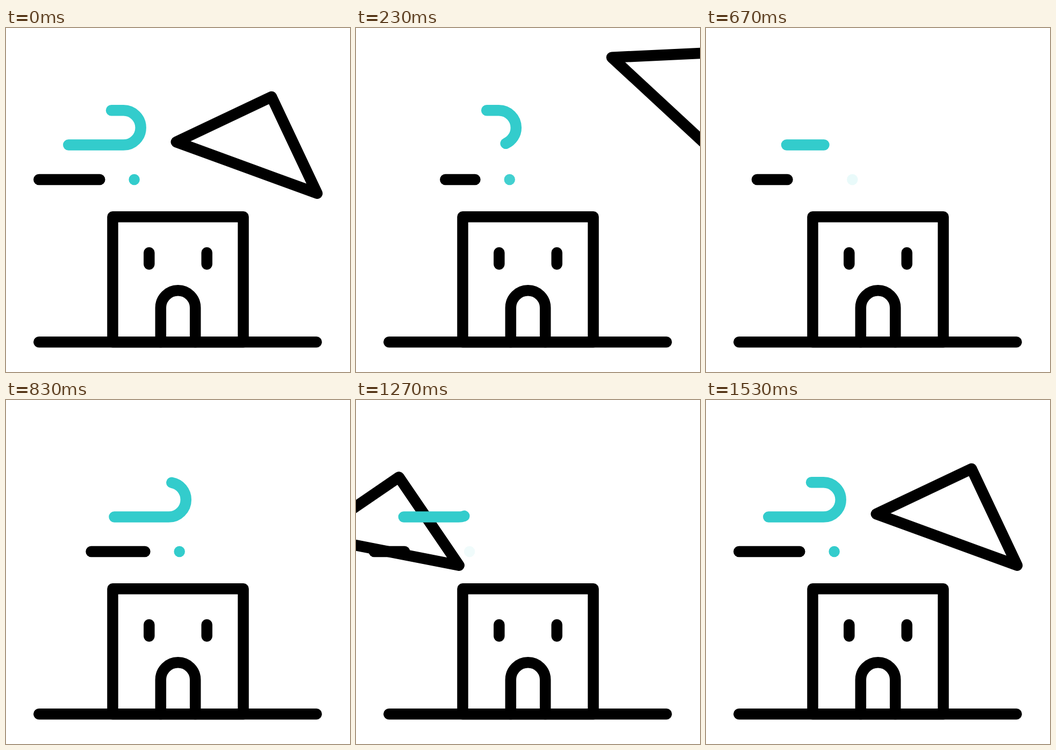
These frames come from a looping animation (640 by 640 pixels, 1670 ms). An HTML page:

```html
<!DOCTYPE html>
<html lang="en">
<head>
<meta charset="utf-8">
<title>Roof in the wind</title>
<style>
  html, body { margin: 0; width: 100%; height: 100%; overflow: hidden; background: #fff; }
  svg { display: block; width: 100%; height: 100%; }
  .ink { fill: none; stroke: #000; stroke-width: 20.5; stroke-linecap: round; stroke-linejoin: round; }
  .teal { stroke: #3cc; }
</style>
</head>
<body>
<svg viewBox="0 0 640 640">
  <g class="ink">
    <path d="M198.5 351.3H441.5V584.3H198.5Z"/>
    <path d="M61.3 584.3H577.5"/>
    <path d="M266.3 418V439.5M373.7 418V439.5"/>
    <path d="M287.8 584.3V520.5a32.2 32.2 0 0 1 64.4 0V584.3"/>
    <path id="roof" d="M-262 -95.7L-84.8 -179.7L0 0Z"/>
    <g id="wind">
      <path id="line" pathLength="1" d="M61.3 282H174.3"/>
      <path id="curl" class="teal" pathLength="1" d="M116.3 217.6H218.5a32.2 32.2 0 0 0 0 -64.4H196"/>
      <circle id="dot" cx="238.6" cy="282" r="10.25" fill="#3cc" stroke="none"/>
    </g>
  </g>
</svg>
<script>
const LOOP = 1670, FPS = 30;
const [roof, wind, line, curl, dot] =
  ['roof', 'wind', 'line', 'curl', 'dot'].map(id => document.getElementById(id));

const clamp = x => Math.min(1, Math.max(0, x));
const ease = (n, from, to) => {
  const u = clamp((n - from) / (to - from));
  return u * u * (3 - 2 * u);
};
const bezier = (a, b, c, s) => (1 - s) * (1 - s) * a + 2 * s * (1 - s) * b + s * s * c;

function trim(path, from, to) {
  const len = to - from;
  path.style.visibility = len > 0.001 ? 'visible' : 'hidden';
  path.setAttribute('stroke-dasharray', Math.max(len, 0) + ' 9');
  path.setAttribute('stroke-dashoffset', -from);
}

// The roof pivots on its right corner.
function roofPose(n) {
  if (n < 16) {
    const s = clamp(n / 13) ** 1.365;
    return [bezier(578.8, 688, 840, s), bezier(307.7, 205, 236, s), 33.7 * (1 - (1 - s) ** 2)];
  }
  const away = 168 * (Math.max(0, 46 - n) / 5) ** 1.776;
  return [578.8 - away, 307.7, -away * 0.02326];
}

// Three gusts: one leaves, one passes by, one arrives.
function windPose(n) {
  if (n < 15) {
    const p = ease(n, 0.8, 13);
    return { x: 92 * p, line: [p, 1], curl: [p, 1], dot: 1 - ease(n, 6, 12) };
  }
  if (n < 33) return {
    x: 92 * ease(n, 15, 27.2),
    line: [ease(n, 23.3, 31.3), ease(n, 15, 25)],
    curl: [ease(n, 24.7, 32), ease(n, 15.5, 27.7)],
    dot: ease(n, 19, 24) - ease(n, 26, 32)
  };
  const p = ease(n, 33, 43);
  return { x: -55 * (1 - p), line: [0, p], curl: [0, p], dot: ease(n, 37, 43) };
}

function draw(ms) {
  const n = Math.floor((ms + 3.4) * FPS / 1000);
  const [x, y, turn] = roofPose(n);
  roof.setAttribute('transform', `translate(${x} ${y}) rotate(${turn})`);
  const w = windPose(n);
  wind.setAttribute('transform', `translate(${w.x} 0)`);
  trim(line, ...w.line);
  trim(curl, ...w.curl);
  dot.setAttribute('opacity', w.dot);
}

const start = performance.now();
function tick() {
  draw((performance.now() - start) % LOOP);
  requestAnimationFrame(tick);
}
tick();
</script>
</body>
</html>
```
